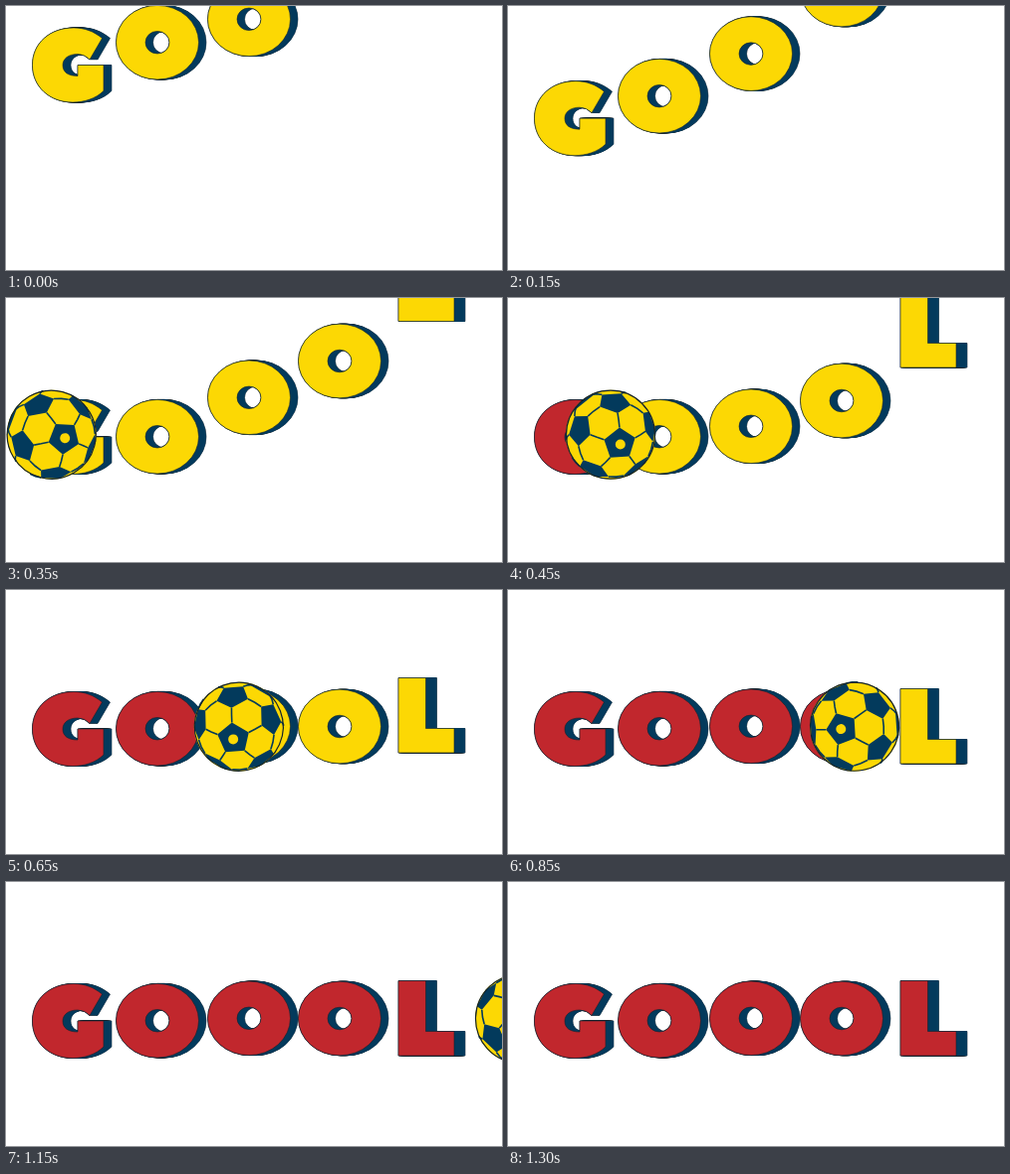
An HTML page with a canvas that plays this animation: 498 px wide and 266 px high, repeating every 1.4 s.

```html
<!DOCTYPE html>
<html lang="en">
<head>
<meta charset="utf-8">
<title>Goool</title>
<style>
html, body { margin: 0; width: 100%; height: 100%; overflow: hidden; background: #fff; }
canvas { display: block; }
</style>
</head>
<body>
<canvas id="stage" width="498" height="266"></canvas>
<script>
const ctx = document.getElementById('stage').getContext('2d');
const YELLOW = '#fcd804', RED = '#c1272d', NAVY = '#033a5c', INK = '#14232c';
const LOOP = 1400, STEP = 50, LAST = 1300;
const RADIUS = 45, BALL_Y = 137.7, PATCH = 0.36;

// Linear interpolation through [time, value] keys, held at both ends.
function along(keys, t) {
  if (t <= keys[0][0]) return keys[0][1];
  for (let i = 1; i < keys.length; i++) {
    const [t0, a] = keys[i - 1], [t1, b] = keys[i];
    if (t < t1) return a + (b - a) * (t - t0) / (t1 - t0);
  }
  return keys[keys.length - 1][1];
}

function ring(x, y) {
  const path = new Path2D();
  path.ellipse(x, y, 41.5, 37.3, 0, 0, 7);
  path.closePath();
  path.moveTo(x + 12, y);
  path.ellipse(x, y, 12, 11.3, 0, 0, 7);
  path.closePath();
  return path;
}

const shapeG = new Path2D(`M96.5 113 L84 134.5 Q79 129 72 129 C62 129 57 134 57 140
  C57 147 62 151 72 151 V140 H98 V166 C90 174 78 177.5 67 177.5
  C44 177.5 26.5 162 26.5 140 C26.5 118 44 102.5 68 102.5 C79 102.5 88 106 96.5 113 Z`);
const shapeL = new Path2D('M394 99.5 H421.5 V150.5 H450 V175 H394 Z');

// mid: ball position that turns the letter red; drop: vertical offset over time
const letters = [
  { shape: shapeG, mid: 67, depth: 8, drop: [[0, -80.5], [225, 0]] },
  { shape: ring(152, 139.7), mid: 152, depth: 7.5, drop: [[0, -103], [250, -13], [286, 0]] },
  { shape: ring(244, 137.3), mid: 247, depth: 7.5, drop: [[0, -124], [250, -66], [450, -8], [480, 0]] },
  { shape: ring(335, 137.5), mid: 338, depth: 7.5, drop: [[0, -214], [250, -114], [450, -34], [535, 0]] },
  { shape: shapeL, mid: 420, depth: 11, drop: [[250, -198], [450, -105], [650, -11], [674, 0]] }
];

const ballX = [[150, -68], [250, -11.5], [450, 103], [650, 233.8], [850, 348], [1000, 429], [1300, 603]];
const ballTurn = [[150, -45], [250, -16], [450, 45], [650, 114], [850, 170], [1000, 222], [1300, 322]];

// Football pattern: pentagons on the corners of an icosahedron, seams along its edges.
function buildBall() {
  const rad = Math.PI / 180, tilt = 18 * rad, z = 1 / Math.sqrt(5);
  const corners = [[0, 0, 1], [0, 0, -1]];
  for (let k = 0; k < 5; k++) {
    const a = (151 + 72 * k) * rad, b = a + 36 * rad;
    corners.push([2 * z * Math.cos(a), 2 * z * Math.sin(a), z]);
    corners.push([2 * z * Math.cos(b), 2 * z * Math.sin(b), -z]);
  }
  const c = Math.cos(tilt), s = Math.sin(tilt);
  const points = corners.map(([x, y, h]) => [x * c + h * s, y, h * c - x * s]);
  const between = (p, q, f) => {
    const v = p.map((n, i) => n + (q[i] - n) * f), len = Math.hypot(...v);
    return v.map(n => n / len);
  };
  // Points behind the ball are pushed out to its rim.
  const project = ([x, y, h]) => {
    const scale = RADIUS / (h < 0 ? Math.hypot(x, y) : 1);
    return [x * scale, y * scale];
  };
  const patches = new Path2D(), seams = new Path2D();
  for (const p of points) {
    const near = points.filter(q => q !== p && p[0] * q[0] + p[1] * q[1] + p[2] * q[2] > 0.4);
    for (const q of near) {
      if (between(p, q, 0.5)[2] < 0) continue;
      seams.moveTo(...project(between(p, q, PATCH)));
      seams.lineTo(...project(between(p, q, 0.5)));
      seams.lineTo(...project(between(p, q, 1 - PATCH)));
    }
    if (p[2] < -0.25) continue;
    const poly = near.map(q => project(between(p, q, PATCH)));
    const mx = poly.reduce((n, v) => n + v[0], 0) / 5, my = poly.reduce((n, v) => n + v[1], 0) / 5;
    poly.sort((u, v) => Math.atan2(u[1] - my, u[0] - mx) - Math.atan2(v[1] - my, v[0] - mx));
    poly.forEach((v, i) => i ? patches.lineTo(...v) : patches.moveTo(...v));
    patches.closePath();
  }
  return { patches, seams, badge: project(points[0]) };
}
const ball = buildBall();

function disc(x, y, r) {
  ctx.beginPath();
  ctx.arc(x, y, r, 0, 7);
}

function drawLetter({ shape, mid, depth, drop }, t) {
  const y = along(drop, t);
  const extrude = paint => {
    for (let d = 0; d <= depth; d += 0.5) {
      ctx.setTransform(1, 0, 0, 1, d, y);
      paint();
    }
  };
  ctx.lineWidth = 0.6;
  ctx.strokeStyle = INK;
  ctx.fillStyle = NAVY;
  extrude(() => ctx.stroke(shape));
  extrude(() => ctx.fill(shape, 'evenodd'));
  ctx.setTransform(1, 0, 0, 1, 0, y);
  ctx.fillStyle = along(ballX, t) >= mid ? RED : YELLOW;
  ctx.fill(shape, 'evenodd');
  ctx.stroke(shape);
}

function drawBall(t) {
  ctx.setTransform(1, 0, 0, 1, along(ballX, t), BALL_Y);
  ctx.rotate(along(ballTurn, t) * Math.PI / 180);
  disc(0, 0, RADIUS);
  ctx.fillStyle = YELLOW;
  ctx.fill();
  ctx.fillStyle = ctx.strokeStyle = NAVY;
  ctx.lineWidth = 1.6;
  ctx.fill(ball.patches);
  ctx.stroke(ball.seams);
  disc(...ball.badge, 5);
  ctx.fillStyle = YELLOW;
  ctx.fill();
  disc(0, 0, RADIUS - 0.5);
  ctx.strokeStyle = INK;
  ctx.lineWidth = 1.2;
  ctx.stroke();
}

function frame() {
  const t = Math.min(LAST, Math.floor(performance.now() % LOOP / STEP) * STEP);
  ctx.setTransform(1, 0, 0, 1, 0, 0);
  ctx.fillStyle = '#fff';
  ctx.fillRect(0, 0, 498, 266);
  for (const letter of letters) drawLetter(letter, t);
  drawBall(t);
  requestAnimationFrame(frame);
}
frame();
</script>
</body>
</html>
```
